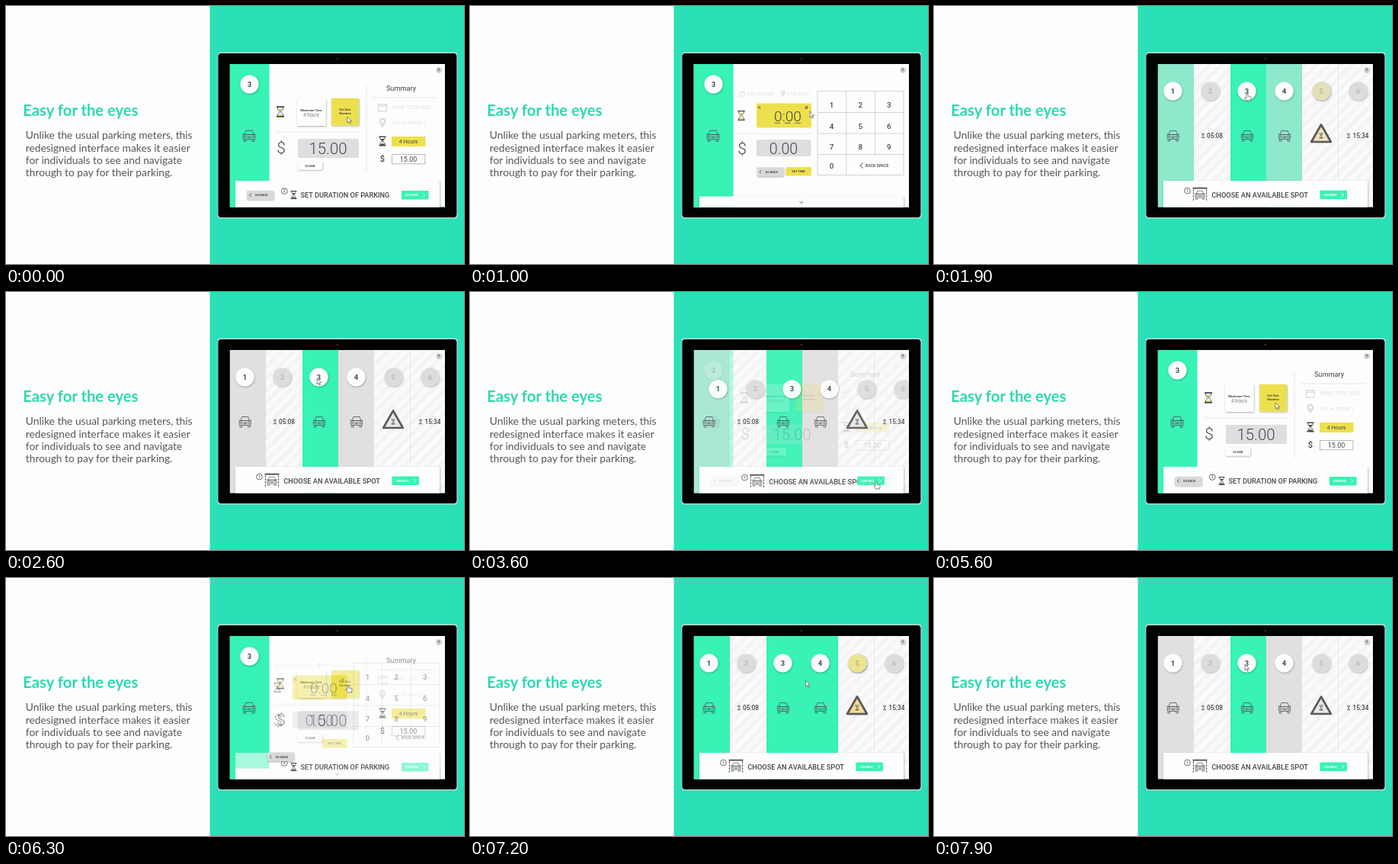
Animation, 601 px wide and 338 px high, one loop 8 s. Source, as an HTML page:

```html
<!DOCTYPE html>
<html lang="en">
<head>
<meta charset="utf-8">
<title>Parking meter interface</title>
<style>
html, body { margin: 0; width: 100%; height: 100%; overflow: hidden; background: #fdfdfd; }
svg { display: block; width: 100vw; height: 100vh; }
text { font-family: Roboto, Arial, sans-serif; fill: #45454a; }
.copy { font: 13.8px Lato, sans-serif; fill: #56565a; }
.head { font: bold 20.2px Lato, sans-serif; fill: #2bdab2; }
</style>
</head>
<body>
<svg id="stage" viewBox="0 0 601 338"></svg>
<script>
const GREEN = '#38f2b6', GREY = '#e2dfe2', YELLOW = '#ede04d', DARK = '#47474b', PALE = '#dedde0';
const LOOP = 8000, CYCLE = 5800;

const rect = (x, y, w, h, fill, more = '') =>
  `<rect x="${x}" y="${y}" width="${w}" height="${h}" fill="${fill}" ${more}/>`;
const label = (s, x, y, size, weight = 400, more = '') =>
  `<text x="${x}" y="${y}" font-size="${size}" font-weight="${weight}" ${more}>${s}</text>`;
const mid = (s, x, y, size, weight = 400, more = '') =>
  label(s, x, y, size, weight, `text-anchor="middle" ${more}`);
const line = (d, stroke = DARK, width = 1, more = '') =>
  `<path d="${d}" fill="none" stroke="${stroke}" stroke-width="${width}" ${more}/>`;
const use = (id, x, y, scale = 1, more = '') =>
  `<use href="#${id}" transform="translate(${x} ${y}) scale(${scale})" ${more}/>`;
const group = (id, body) => `<g id="${id}">${body}</g>`;
const SHADOW = 'filter="url(#shadow)"';

const defs = `<defs>
  <filter id="shadow" x="-20%" y="-30%" width="140%" height="170%">
    <feDropShadow dx=".6" dy="1" stdDeviation="1.1" flood-opacity=".32"/></filter>
  <pattern id="stripes" width="11" height="11" patternUnits="userSpaceOnUse" patternTransform="rotate(45)">
    ${rect(0, 0, 11, 11, '#fafafb')}${rect(0, 0, 5, 11, '#f4f3f5')}</pattern>
  <clipPath id="screen">${rect(293.8, 76, 282.2, 187.5, '#fff')}</clipPath>
  <g id="car" fill="none" stroke="#58585c" stroke-width=".85" stroke-linejoin="round">
    <path d="M-5.8 -1.5L-4 -6.5H4L5.8 -1.5M-8.3 -2.3L-5.8 -1.5H5.8L8.3 -2.3"/>
    <rect x="-7.6" y="-1.5" width="15.2" height="6" rx="1.6"/>
    <circle cx="-4.9" cy="1.3" r="1.3"/><circle cx="4.9" cy="1.3" r="1.3"/>
    <path d="M-2.4 1H2.4M-2.4 2.6H2.4M-6.7 4.5V7H-4V4.5M6.7 4.5V7H4V4.5"/></g>
  <g id="glass" stroke="#47474b" fill="none">
    <path d="M-5 -6.4H5M-5 6.4H5" stroke-width="1.6"/>
    <path d="M-3.8 -6C-3.8 -2 -.7 -1.4 -.7 0C-.7 1.4 -3.8 2 -3.8 6M3.8 -6C3.8 -2 .7 -1.4 .7 0C.7 1.4 3.8 2 3.8 6"/>
    <path d="M-2.8 -3.3H2.8L0 0ZM-3.2 5.5C-2.6 3 2.6 3 3.2 5.5Z" fill="currentColor" stroke="none"/></g>
  <g id="calendar"><path d="M-5.5 -4H5.5V5H-5.5ZM-5.5 -1.6H5.5M-3 -5.5V-3M3 -5.5V-3" fill="none"
    stroke="#dedde0" stroke-width="1.3"/></g>
  <g id="pin"><path fill-rule="evenodd" fill="#dedde0"
    d="M0 6.5C-3 2.5 -4.6 .5 -4.6 -2A4.6 4.6 0 0 1 4.6 -2C4.6 .5 3 2.5 0 6.5ZM0 -3.8A1.8 1.8 0 1 0 .01 -3.8Z"/></g>
</defs>`;

const badge = (n, x, y, fill = '#fdfdfd', ink = DARK) =>
  `<circle cx="${x}" cy="${y}" r="12" fill="${fill}" ${SHADOW}/>` +
  mid(n, x, y + 3.3, 9.4, 700, `style="fill:${ink}"`);
const bar = y => rect(301, y, 268, 50, '#fdfdfd', SHADOW);
const step = (n, x, y) => `<circle cx="${x}" cy="${y}" r="3.9" fill="none" stroke="${DARK}" stroke-width=".8"/>` +
  mid(n, x, y + 1.7, 4.6, 500);
const goOn = (x, y) => rect(x, y, 35.5, 11.5, GREEN, 'rx="1.2"') +
  label('CONTINUE', x + 5, y + 7.2, 3.5, 700, 'style="fill:#fff"') +
  line(`M${x + 28.5} ${y + 3.4}l2.2 2.4l-2.2 2.4`, '#fff', .9);

// Screen 1: choosing a spot
const COLS = [293, 341, 389, 436, 483, 530, 577];
const CENTRES = [313.5, 362.5, 410.5, 459.5, 508.5, 556.5];
const column = (i, fill) => rect(COLS[i], 76, COLS[i + 1] - COLS[i], 188, fill);
const taken = i => i === 1 || i > 3;

const spotsBack = COLS.slice(0, 6).map((_, i) =>
    column(i, taken(i) ? 'url(#stripes)' : i === 2 ? GREEN : GREY)).join('') +
  line('M530.5 76V264', '#e6e5e7', .8) +
  group('open', column(0, GREEN) + column(3, GREEN)) + bar(229);

const triangle = 'M508 155.5L520.8 178H495.2Z';
const spotsFront =
  group('badges', CENTRES.map((x, i) =>
    badge(i + 1, x, 111.5, taken(i) ? '#dcdbdd' : '#fdfdfd', taken(i) ? '#bcbbbe' : DARK)).join('') +
    group('fault', badge(5, CENTRES[4], 111.5, '#ece48e', '#b9b48c'))) +
  use('car', 313.7, 170) + use('car', 411, 170) + use('car', 460, 170) +
  use('glass', 353, 170, .42, `color="${DARK}"`) + label('05:08', 358, 172.9, 8.2, 500) +
  use('glass', 544, 170, .42, `color="${DARK}"`) + label('15:34', 549.5, 172.9, 8.2, 500) +
  `<path d="${triangle}" fill="#e9e7e9" stroke="#5a5a5d" stroke-width="2.6" stroke-linejoin="round"/>` +
  `<path id="faultSign" d="${triangle}" fill="#f1dc96" stroke="#5a5a5d" stroke-width="2.6" stroke-linejoin="round"/>` +
  use('glass', 508, 170, .48, `color="${DARK}"`) +
  group('spotTitle', step(1, 332.5, 242) + use('car', 349, 247.5, .82) +
    line('M339.5 238.7H358.5', DARK, 1.8) + line('M340.4 240V256M357.6 240V256', DARK, .9, 'stroke-dasharray="3 1"') +
    label('CHOOSE AN AVAILABLE SPOT', 364.3, 250.7, 9.25, 500)) +
  group('spotButton', goOn(506.5, 241.5));

// Screens 2 and 3 share the green side panel
const paper = rect(293, 76, 284, 188, '#fdfdfd');
const side = rect(293, 76, 52.5, 188, GREEN);
const sideIcons = badge(3, 319.5, 102.5) + use('car', 319, 170, 1.05);
const dollar = (x, y, size, weight) => mid('$', x, y, size, weight);

const durationBase = paper + bar(229) + goOn(519, 242);
const durationSide = `<path d="M293 76H345.5V229H301V264H293Z" fill="${GREEN}"/>`;
const durationBody = sideIcons +
  use('glass', 360, 138.5, 1, 'color="#d9c832"') + dollar(361, 193, 21, 300) +
  rect(382, 121, 37.5, 36, '#fdfdfd', `rx="1" ${SHADOW}`) +
  mid('Maximum Time', 400.5, 137.6, 4.1, 700) + mid('4 hours', 400.5, 144.6, 6.3, 300) +
  rect(427, 121, 36, 35.5, YELLOW, `rx="1" ${SHADOW}`) +
  mid('Set Own', 445, 137.4, 4.1, 700) + mid('Duration', 445, 142.4, 4.1, 700) +
  line('M355 165H463M473 104V218', '#e4e3e5', .8) +
  rect(383, 174, 80, 25, '#dfdde0', 'rx="2"') + mid('15.00', 422.5, 193.7, 20.4, 300) +
  rect(383, 204, 32, 10.5, '#fdfdfd', `rx="1" ${SHADOW}`) + mid('CLEAR', 399, 210.8, 4.2, 700) +
  mid('Summary', 518.5, 111, 9.2, 400) + line('M481 120H566', '#e4e3e5', .8) +
  use('calendar', 494, 133) + use('pin', 494, 153) +
  label('APRIL 12TH, 2020', 507, 135.3, 6.3, 400, `style="fill:${PALE}"`) +
  label('LOT # - SPACE 1', 507, 155.3, 6.1, 400, `style="fill:${PALE}"`) +
  use('glass', 494, 177, .9, `color="${DARK}"`) + rect(506, 171, 44.5, 13, YELLOW) +
  mid('4 Hours', 528, 179.9, 7.2, 400) +
  dollar(494, 204, 11, 500) + rect(506.4, 194.4, 43.5, 12.4, '#fdfdfd', 'stroke="#a9a8ac" stroke-width=".8"') +
  mid('15.00', 528, 203.8, 8.9, 400);
const durationTitle = step(2, 365.3, 242.5) + use('glass', 377.5, 247.5, .78, `color="${DARK}"`) +
  label('SET DURATION OF PARKING', 386.5, 250.7, 9.2, 500);

const keys = [...'123456789'].map((n, i) =>
  mid(n, 474.5 + i % 3 * 37.7, 133.2 + Math.floor(i / 3) * 27.3, 9.8, 500)).join('');
const keypad = paper + side + sideIcons +
  use('calendar', 357, 115, .6) + use('pin', 411, 115, .6) +
  label('APRIL 12TH, 2020', 363, 116.7, 4.5, 400, `style="fill:${PALE}"`) +
  label('LOT #, SPACE 1', 415.5, 116.7, 4.5, 400, `style="fill:${PALE}"`) +
  use('glass', 356, 143.5, .92, 'color="#d9c832"') + dollar(357, 194.3, 21, 300) +
  rect(376, 127.5, 72, 32, YELLOW, 'rx="2"') +
  label('H', 378, 134.5, 4.6, 500) + label('M', 439.5, 134.5, 4.6, 500) +
  mid('0:00', 417, 151, 19.2, 300) + line('M399.5 153.3H407M413 153.3H420.5M426.5 153.3H434', DARK, .8) +
  line('M350 167H449', '#e4e3e5', .8) +
  rect(376, 175, 71.5, 22, '#dfdde0', 'rx="2"') + mid('0.00', 411.5, 193.5, 19.7, 300) +
  rect(414.5, 211, 33.5, 11.5, YELLOW, 'rx="1.5"') + mid('SET TIME', 431, 218.2, 4, 700) +
  rect(456, 111.5, 113, 110, '#fdfdfd', 'stroke="#cfced1" stroke-width=".9"') +
  line('M456 139.5H569M456 167H569M456 194.5H569M493.7 111.5V221.5M531.4 111.5V194.5', '#cfced1', .9) +
  keys + mid('0', 474.5, 213, 9.8, 500) +
  line('M515.5 205.5L512 209L515.5 212.5', DARK, 1) + label('BACK SPACE', 519, 210.8, 5.2, 500) +
  bar(249.5) + line('M432.6 256.2L434.7 258.4L436.8 256.2', DARK, .9);

const back = rect(316, 242, 35, 11.5, '#d9d8da', `rx="1.5" ${SHADOW}`) +
  line('M321.7 245.5L319.6 247.7L321.7 249.9', DARK, .9) + label('GO BACK', 327, 249.2, 3.9, 700);

const arrow = '<path d="M0 0V8L1.9 6.3L3.2 9.2L4.5 8.6L3.2 5.8H5.7Z" fill="#fdfdfd" stroke="#555" stroke-width=".7"/>';
const hand = `<path d="M-1 1Q0 -.6 1 1V4L4.4 4.8Q5.4 5.2 5.1 6.6L4.4 10H-.6L-3.4 6.4Q-3.2 5 -1 6.4Z"
  fill="#fdfdfd" stroke="#555" stroke-width=".7" stroke-linejoin="round"/>`;

const copy = ['Unlike the usual parking meters, this', 'redesigned interface makes it easier',
  'for individuals to see and navigate', 'through to pay for their parking.'];

const stage = document.getElementById('stage');
stage.innerHTML = defs + rect(0, 0, 601, 338, '#fdfdfd') + rect(267.5, 0, 333.5, 338, '#2bdfb7') +
  '<text class="head" x="22.3" y="144.3">Easy for the eyes</text>' +
  copy.map((s, i) => `<text class="copy" x="25.8" y="${174.2 + i * 16.4}">${s}</text>`).join('') +
  rect(277.5, 60.6, 315, 217.6, '#c4dcd5', 'rx="4"') + rect(278.4, 62, 313, 215, '#020202', 'rx="4"') +
  '<circle cx="435" cy="69" r="1.3" fill="#303236"/>' +
  '<g clip-path="url(#screen)">' + group('spotsBack', spotsBack) +
  group('durationBase', durationBase) + group('durationSide', durationSide) +
  group('durationBody', durationBody) + group('keypad', keypad) +
  group('durationTitle', durationTitle) + group('back', back) + group('spotsFront', spotsFront) +
  '<circle cx="568" cy="84" r="3.9" fill="#d3d2d5"/>' + mid('?', 568, 86, 5.6, 700) +
  group('arrow', arrow) + group('hand', hand) + '</g>';

const part = Object.fromEntries([...stage.querySelectorAll('g[id], path[id]')].map(e => [e.id, e]));
const fade = (id, a) => {
  part[id].setAttribute('opacity', a);
  part[id].style.display = a > 0 ? '' : 'none';
};
const move = (id, x, y) => part[id].setAttribute('transform', `translate(${x} ${y})`);
const ramp = (t, from, to) => Math.min(1, Math.max(0, (t - from) / (to - from)));
const smooth = q => q * q * (3 - 2 * q);

// time, x, y
const CURSOR = [[0, 448, 145], [300, 448, 145], [450, 449, 140], [1000, 446, 138], [1300, 446, 138],
  [1700, 411, 114], [1900, 411, 114], [2100, 408, 113], [2600, 408, 113], [3350, 533, 248],
  [4000, 533, 248], [4700, 477, 219], [5350, 448, 145], [CYCLE, 448, 145]];
const HANDS = [[350, 850], [1550, 2000], [3200, 3950]];

function cursorAt(t) {
  const i = CURSOR.findIndex((k, n) => n && t <= k[0]);
  const a = CURSOR[i - 1], b = CURSOR[i], q = smooth(ramp(t, a[0], b[0]));
  return [a[1] + (b[1] - a[1]) * q, a[2] + (b[2] - a[2]) * q];
}

function draw(t) {
  const choosing = t >= 1300 && t < 3900;
  const picked = ramp(t, 1750, 2050);
  const next = ramp(t, 3400, 3900);
  const typing = t < 1300 ? ramp(t, 280, 780) : 0;
  const shown = choosing ? next : 1;

  fade('spotsBack', choosing ? 1 : 0);
  fade('spotsFront', choosing ? 1 - next ** 3 : 0);
  fade('open', 1 - picked);
  fade('fault', 1 - picked);
  fade('faultSign', 1 - picked);
  const glide = 1 - (1 - next) ** 4;
  move('badges', 13.8 * glide, 18 * glide);
  move('spotTitle', 32 * glide, 1.2 * glide);
  move('spotButton', 2.2 * glide, 0);

  fade('durationBase', shown ** 3);
  fade('durationSide', shown ** 1.2);
  fade('durationBody', shown ** 1.8);
  fade('durationTitle', shown ** 3 * (1 - typing ** 3));
  fade('keypad', typing);
  fade('back', shown ** 2);
  move('back', 60.5 * typing, -30.5 * typing);

  const [x, y] = cursorAt(t);
  const pointing = HANDS.some(([a, b]) => t >= a && t < b);
  fade('arrow', pointing ? 0 : 1);
  fade('hand', pointing ? 1 : 0);
  move('arrow', x, y);
  move('hand', x, y);
}

const start = performance.now();
function tick() {
  const t = Math.floor((performance.now() - start) % LOOP / 100) * 100;
  draw(t % CYCLE);
  requestAnimationFrame(tick);
}
tick();
</script>
</body>
</html>
```
